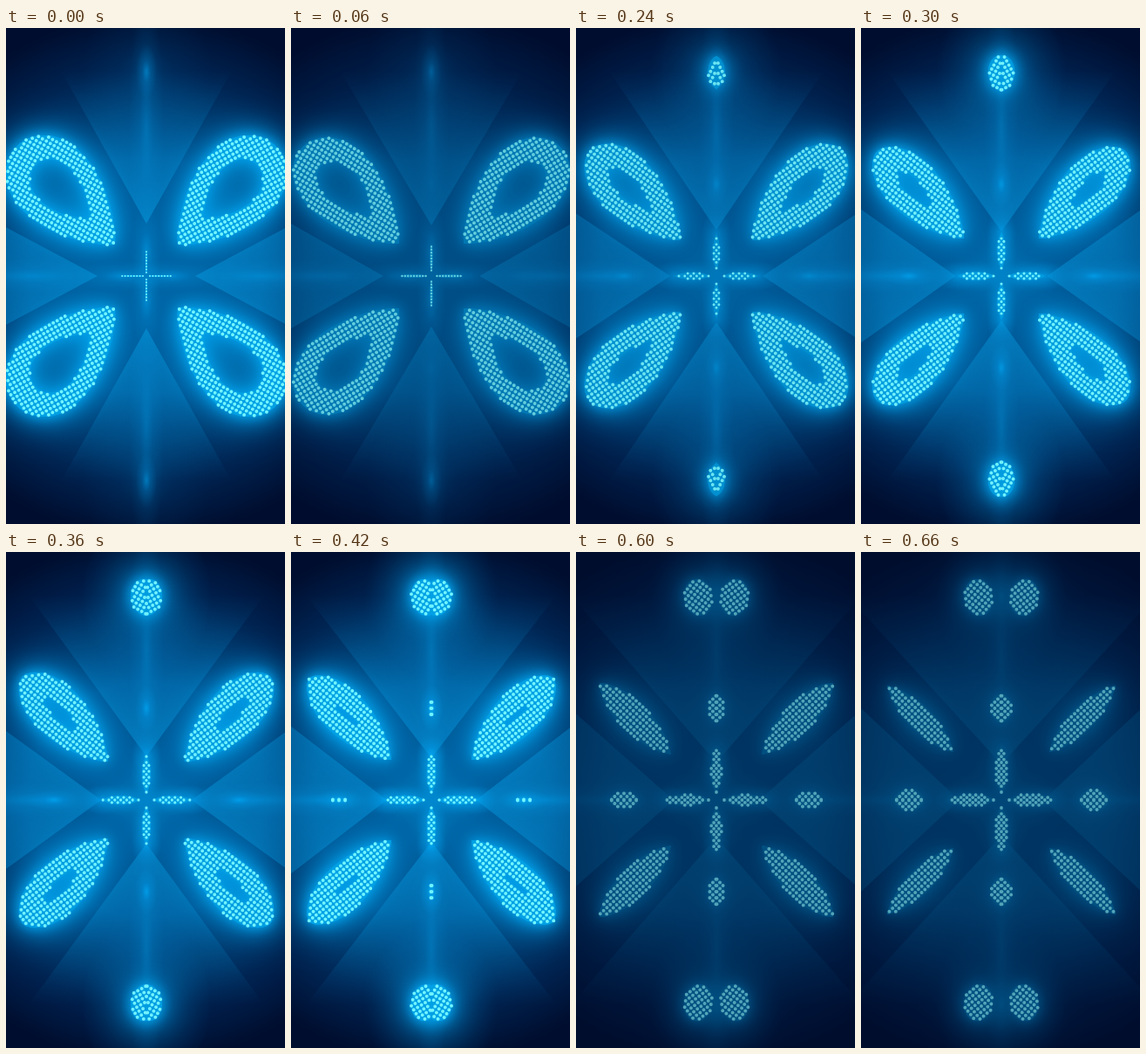
An HTML page with a canvas for the animation above (720 ms loop, 320 by 568 pixels).

```html
<!DOCTYPE html>
<html lang="en">
<head>
<meta charset="utf-8">
<title>Kaleidoscope</title>
<style>
html, body { margin: 0; width: 100%; height: 100%; overflow: hidden; background: #000d2e; }
canvas { display: block; width: 100vw; height: 100vh; }
</style>
</head>
<body>
<canvas id="stage" width="320" height="568"></canvas>
<script>
const ctx = document.getElementById('stage').getContext('2d');
const W = 320, H = 568, CX = 161, CY = 284, LOOP = 720;
const MIRRORS = [[1, 1], [-1, 1], [1, -1], [-1, -1]];
const LIGHT = [[0, 1], [4, 0], [7, 0.8], [9, 0.95], [12, 1], [15, 0], [19, 0]];
const rad = deg => deg * Math.PI / 180;
const mix = (a, b, k) => a + (b - a) * k;
const rgb = (a, b, k) => `rgb(${a.map((v, n) => Math.round(mix(v, b[n], k)))})`;

function lightAt(i) {
  const n = Math.max(1, LIGHT.findIndex(p => p[0] >= i));
  const [a, va] = LIGHT[n - 1], [b, vb] = LIGHT[n];
  return mix(va, vb, (i - a) / (b - a));
}

// Shapes live in one quadrant, measured outwards from the centre.
function poly(points) {
  const p = new Path2D();
  points.forEach(([x, y]) => p.lineTo(x, y));
  p.closePath();
  return p;
}

// Drop along the diagonal: pointed at the near end, rounder at the far end.
function drop(near, far, half, b) {
  const a = 0.88, top = a / (a + b), peak = Math.pow(top, a) * Math.pow(1 - top, b), pts = [];
  for (let n = 0; n <= 80; n++) {
    const side = n <= 40 ? 1 : -1;
    const s = Math.sin((n <= 40 ? n : 80 - n) / 40 * Math.PI / 2);
    const v = side * half * Math.pow(s, a) * Math.pow(1 - s, b) / peak * Math.SQRT1_2;
    const d = mix(near, far, s);
    pts.push([d + v, d - v]);
  }
  return poly(pts);
}

// Oval sliding out from behind a mirror line.
function oval(x, y, rx, ry, tilt, clampX, clampY) {
  const pts = [], c = Math.cos(tilt), s = Math.sin(tilt);
  for (let n = 0; n < 60; n++) {
    const a = n / 60 * 2 * Math.PI, u = rx * Math.cos(a), v = ry * Math.sin(a);
    const px = x + u * c - v * s, py = y + u * s + v * c;
    pts.push([clampX ? Math.max(0, px) : px, clampY ? Math.max(0, py) : py]);
  }
  return poly(pts);
}

const armWidth = (s, half) => half * Math.pow(4 * s * (1 - s), 0.8);

function arm(r0, r1, half, upright) {
  const pts = [[r0, 0]];
  for (let n = 0; n <= 20; n++) pts.push([mix(r0, r1, n / 20), armWidth(n / 20, half)]);
  return poly(upright ? pts.map(([u, v]) => [v, u]) : pts);
}

function grid(path, x, y, size, pitch, angle, out) {
  const c = Math.cos(angle), s = Math.sin(angle), n = Math.ceil(size / pitch);
  for (let j = -n; j <= n; j++) for (let k = -n; k <= n; k++) {
    const px = x + (j * c - k * s) * pitch, py = y + (j * s + k * c) * pitch;
    if (ctx.isPointInPath(path, px, py, 'evenodd')) out.push([px, py, 2]);
  }
}

function armDots(r0, r1, half, out) {
  const r = Math.min(1.9, 0.9 + half * 0.16);
  for (let n = 0, u = r0 + 1; u < r1; n++, u += 3.4) {
    const w = armWidth((u - r0) / (r1 - r0), half);
    for (let v = n % 2 && half > 2 ? 2.9 : 0; v <= w; v += 5.8) out.push([u, v, r], [v, u, r]);
  }
}

function spot(x, y, rx, ry, alpha) {
  ctx.save();
  ctx.translate(x, y);
  ctx.scale(rx, ry);
  const g = ctx.createRadialGradient(0, 0, 0, 0, 0, 1);
  g.addColorStop(0, `rgba(0,172,250,${alpha})`);
  g.addColorStop(0.4, `rgba(0,158,236,${alpha * 0.4})`);
  g.addColorStop(1, 'rgba(0,150,225,0)');
  ctx.fillStyle = g;
  ctx.fillRect(-1, -1, 2, 2);
  ctx.restore();
}

function wedge(points, x, y, alpha, end) {
  const g = ctx.createLinearGradient(points[0][0], points[0][1], x, y);
  g.addColorStop(0, `rgba(6,156,226,${alpha})`);
  g.addColorStop(1, `rgba(6,156,226,${end})`);
  ctx.fillStyle = g;
  ctx.fill(poly(points));
}

function backdrop(i) {
  ctx.fillStyle = '#000d2e';
  ctx.fillRect(0, 0, W, H);
  ctx.translate(CX, CY);
  const g = ctx.createRadialGradient(0, 0, 0, 0, 0, 300);
  g.addColorStop(0, 'rgb(0,96,160)');
  g.addColorStop(0.45, 'rgb(0,84,146)');
  g.addColorStop(0.78, 'rgb(0,36,82)');
  g.addColorStop(1, 'rgb(0,13,46)');
  ctx.fillStyle = g;
  ctx.fillRect(-CX, -CY, W, H);

  const a = 60 - i, b = 56 - 0.4 * i;
  const up = 300 / Math.tan(rad(60.8 - 0.7 * i)), out = 200 * Math.tan(rad(28 + 0.79 * i));
  const near = Math.min(1, i / 12), tip = 44 + 0.7 * i;
  for (const s of [1, -1]) {
    wedge([[0, s * a], [up, s * (a + 300)], [-up, s * (a + 300)]], 0, s * 235, 0.52, 0);
    wedge([[s * b, 0], [s * (b + 200), out], [s * (b + 200), -out]], s * 200, 0, 0.48, 0.3);
    spot(0, s * 170, 20, 170, 0.3);
    spot(s * 130, 0, 120, 20, 0.36);
    // Soft halos around the buds, seeds and arms.
    spot(0, s * 234, 75, 95, 0.15 + 0.35 * near);
    spot(0, s * 234, 12, 32, 0.5);
    spot(0, s * 105, 13, 28, 0.9 * near);
    spot(s * 106, 0, 30, 12, 0.9 * near);
    spot(0, s * 30, 18, 52, 0.5);
    spot(s * 30, 0, 52, 18, 0.5);
    spot(0, s * tip, 18, 22, 0.75 * near);
    spot(s * tip, 0, 22, 18, 0.75 * near);
  }
}

function draw(i) {
  const light = lightAt(i), dots = [], shapes = new Path2D();
  ctx.setTransform(1, 0, 0, 1, 0, 0);

  const near = 36 + 0.55 * i + 0.024 * i * i, far = 148.5 - 0.4 * i - 0.0275 * i * i;
  const b = 0.5 + 0.4 * Math.pow(i / 19, 2.5), hole = 25 - 1.75 * i;
  const petal = drop(near, far, 47 - 1.76 * i, b);
  if (hole > 0) petal.addPath(drop(66 + 1.25 * i, 127 - 0.1 * i - 0.1 * i * i, hole, b));
  shapes.addPath(petal);
  grid(petal, 95, 95, 100, 5.2, rad(30 + 0.75 * i), dots);

  if (i > 3) {
    const x = -15 + 2.75 * (i - 4);
    const bud = oval(x, 232, 16, 21, rad(-11), true, false);
    shapes.addPath(bud);
    grid(bud, Math.max(2, x), 232, 26, 5.2, rad(20 + i), dots);
  }
  if (i > 10) {
    const c = 1.45 * (i - 10.6) - 13;
    const sets = [[oval(c, 105, 13, 16.5, 0, true, false), 0, 105],
                  [oval(106, c, 17, 13, 0, false, true), 106, 0]];
    for (const [seed, x, y] of sets) {
      shapes.addPath(seed);
      grid(seed, x + (x ? 0 : 0.5), y + (y ? 0 : 0.5), 22, 5, rad(45), dots);
    }
  }
  const r0 = Math.min(8, 3 + i * 1.2), r1 = i < 4 ? 28 + 4 * i : 44 + (i - 4) * 1.15;
  const half = i < 7 ? 1 + i * 0.4 : 3.8 + (i - 7) * 0.27;
  shapes.addPath(arm(r0, r1, half, false));
  shapes.addPath(arm(r0, r1, half, true));
  armDots(r0, r1, half, dots);

  backdrop(i);

  const all = new Path2D();
  MIRRORS.forEach(([x, y]) => all.addPath(shapes, new DOMMatrix([x, 0, 0, y, 0, 0])));
  ctx.shadowColor = 'rgb(0,158,232)';
  ctx.fillStyle = 'rgb(0,160,228)';
  for (const blur of [48, 26, 12]) {
    ctx.shadowBlur = blur;
    ctx.fill(all, 'evenodd');
  }
  ctx.shadowBlur = 0;
  ctx.shadowColor = 'transparent';

  ctx.fillStyle = `rgba(0,13,46,${0.54 * (1 - light)})`;
  ctx.fillRect(-CX, -CY, W, H);

  ctx.fillStyle = rgb([82, 164, 184], [112, 244, 255], light);
  ctx.beginPath();
  for (const [sx, sy] of MIRRORS) for (const [x, y, r] of dots) {
    ctx.moveTo(sx * x + r, sy * y);
    ctx.arc(sx * x, sy * y, r, 0, 2 * Math.PI);
  }
  ctx.fill();
}

// Twenty poses: five in every 180 ms, the last of each five held twice as long.
let shown = -1;
function tick() {
  const t = performance.now() % LOOP;
  const i = Math.floor(t / 180) * 5 + Math.min(4, Math.floor(t % 180 / 30));
  if (i !== shown) draw(shown = i);
  requestAnimationFrame(tick);
}
tick();
</script>
</body>
</html>
```
